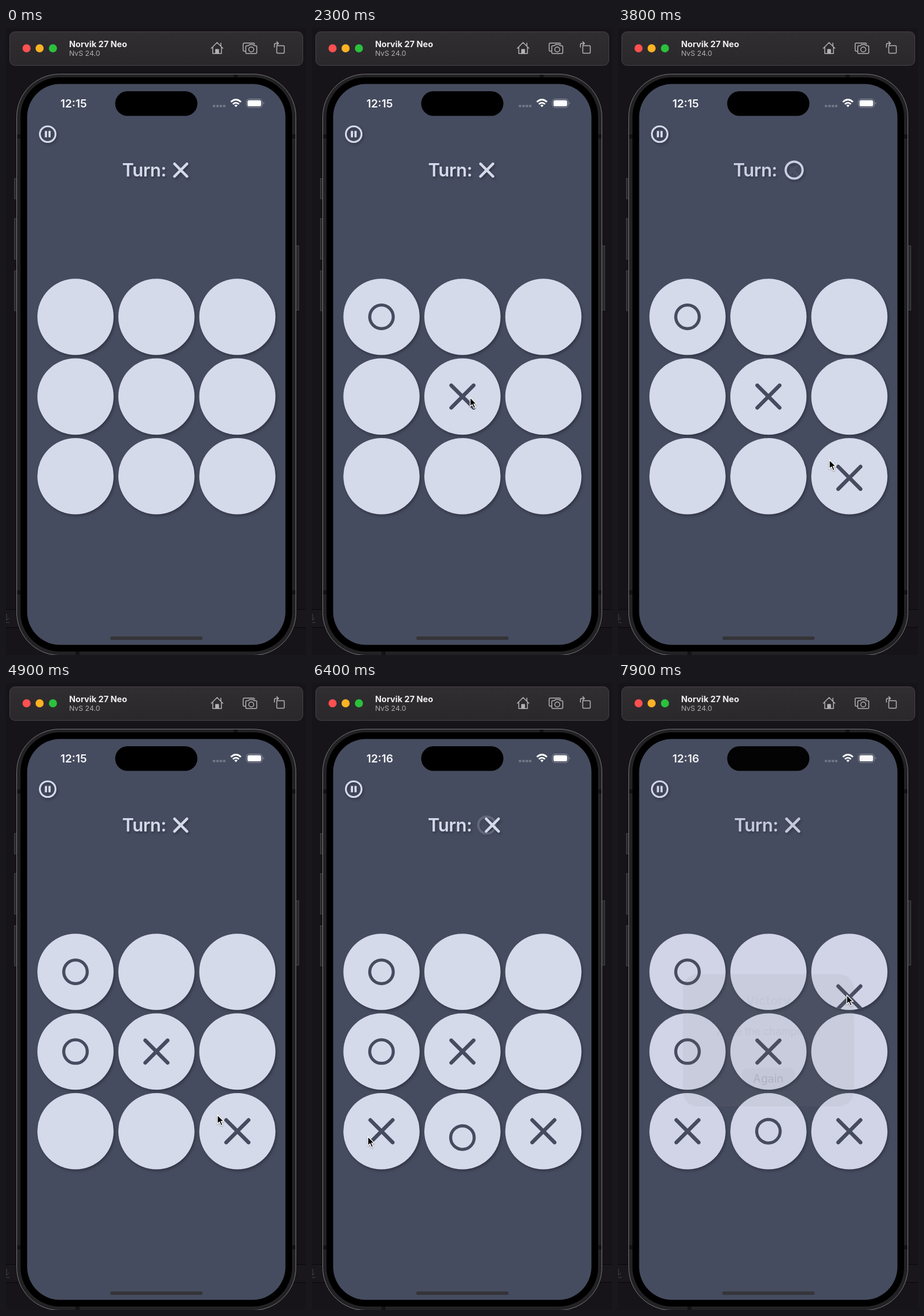
An HTML page for the animation above (8 s loop, 518 px wide and 1081 px high).

```html
<!DOCTYPE html>
<html lang="en">
<head>
<meta charset="utf-8">
<title>Noughts and crosses</title>
<style>
  html, body { margin: 0; width: 100%; height: 100%; overflow: hidden; background: #161418; }
  svg { display: block; width: 100%; height: 100%; }
  text { font-family: Inter, "Liberation Sans", sans-serif; }
  .ink { fill: none; stroke-linecap: round; }
  .soft { filter: drop-shadow(2px 3px 2px rgba(15, 18, 32, .38)); }
  .tool { fill: none; stroke: #b4b2b5; stroke-width: 1.5; stroke-linejoin: round; stroke-linecap: round; }
</style>
</head>
<body>
<svg viewBox="0 0 518 1081" preserveAspectRatio="none">
  <defs>
    <linearGradient id="bar" x2="0" y2="1">
      <stop stop-color="#302e31"/><stop offset="1" stop-color="#2a282b"/>
    </linearGradient>
  </defs>

  <!-- desktop behind the phone -->
  <rect width="518" height="1081" fill="#161418"/>
  <rect y="1003" width="518" height="30" fill="#19171b"/>
  <path d="M0 1002.5H518M0 1033.5H518" stroke="#070608"/>
  <path d="M1 1010V1021M-3 1017L1 1021L5 1017M-4 1025H6" fill="none" stroke="#454347"/>

  <!-- window bar -->
  <rect x="6.5" y="6.5" width="506" height="58" rx="9" fill="url(#bar)" stroke="#454347"/>
  <circle cx="35.5" cy="35" r="7" fill="#fe5050"/>
  <circle cx="58" cy="35" r="7" fill="#fdb224"/>
  <circle cx="81" cy="35" r="7" fill="#2bc13c"/>
  <text x="109" y="32.5" font-size="14.5" font-weight="700" fill="#f0eff1">Norvik 27 Neo</text>
  <text x="109" y="48" font-size="12.3" fill="#b0aeb1">NvS 24.0</text>
  <g class="tool">
    <path d="M354.500 35L364.500 25L374.500 35M357 33V44H372V33M371 31V26"/>
    <path d="M362 44V37H367V44" fill="#b4b2b5"/>
    <path d="M413 40H411.500Q409.500 40 409.500 38V28Q409.500 26 411.500 26H427Q429 26 429 28"/>
    <path d="M416 30.500H418.500L420.500 28.500H426.500L428.500 30.500H431Q433 30.500 433 32.500V42Q433 44 431 44H416Q414 44 414 42V32.500Q414 30.500 416 30.500Z"/>
    <circle cx="423.500" cy="37" r="4.300"/>
    <rect x="467.500" y="30.500" width="13" height="13" rx="1.500"/>
    <path d="M463.500 33V29Q463.500 26.500 466 26.500H470M467.500 23.500L470.500 26.500L467.500 29.500"/>
  </g>

  <!-- phone -->
  <g fill="#29282b" stroke="#434245">
    <rect x="14.500" y="259.500" width="6" height="35"/>
    <rect x="14.500" y="328.500" width="6" height="70"/>
    <rect x="14.500" y="418.500" width="6" height="69"/>
    <rect x="498.500" y="375.500" width="7" height="111"/>
  </g>
  <rect x="18.500" y="79.500" width="482" height="1002" rx="74" fill="#222124" stroke="#777678"/>
  <path d="M19 187H25M494 187H500M19 973H25M494 973H500M396.500 80V86M123.500 1075V1081" stroke="#131214" stroke-width="7"/>
  <rect x="25" y="85" width="469" height="990" rx="68" fill="#000"/>
  <rect x="36.500" y="96.500" width="446" height="967" rx="57" fill="#464c5f"/>
  <rect x="188.500" y="109" width="142" height="42.500" rx="21.200" fill="#000"/>
  <text id="clock" x="94" y="136.500" font-size="19" font-weight="600" fill="#f7f8fb"></text>
  <g fill="#747988">
    <rect x="357" y="132.500" width="4.500" height="4" rx="1.500"/>
    <rect x="363" y="132.500" width="4.500" height="4" rx="1.500"/>
    <rect x="368.800" y="132.500" width="4.500" height="4" rx="1.500"/>
    <rect x="374.500" y="132.500" width="4.500" height="4" rx="1.500"/>
  </g>
  <g fill="none" stroke="#fff" stroke-width="2.800">
    <path d="M388.300 127.500Q397 119.500 405.700 127.500"/>
    <path d="M391.700 131.200Q397 126.500 402.300 131.200"/>
    <path d="M394.200 133.300Q397 131.200 399.800 133.300L397 136.500Z" fill="#fff" stroke="none"/>
  </g>
  <rect x="415" y="122.500" width="27.500" height="14.500" rx="4.500" fill="none" stroke="#8f94a1"/>
  <rect x="417" y="124.500" width="23.500" height="10.500" rx="2.800" fill="#fff"/>
  <path d="M444.300 127.500Q446.800 129.700 444.300 132Z" fill="#8f94a1"/>
  <g class="soft">
    <circle cx="72" cy="183" r="13.500" fill="none" stroke="#d5daeb" stroke-width="3.200"/>
    <path d="M69 177.500V188.500M75.200 177.500V188.500" stroke="#d5daeb" stroke-width="3.800"/>
  </g>
  <rect x="180" y="1049" width="159.500" height="6" rx="3" fill="#343438"/>

  <g id="label" class="soft">
    <text id="turn" y="256" font-size="31" font-weight="600" letter-spacing="-.5" fill="#d5daeb">Turn:</text>
  </g>
  <g id="board"></g>

  <g id="alert">
    <rect x="36.500" y="96.500" width="446" height="967" rx="57" fill="#464c5f" opacity=".04"/>
    <rect x="112" y="502" width="295.500" height="228" rx="26" fill="#777b86" opacity=".09"/>
    <g text-anchor="middle" fill="#464c5f">
      <text x="259.500" y="555" font-size="22" font-weight="600" opacity=".04">Victory</text>
      <text x="259.500" y="607" font-size="18" opacity=".07">X are the champions!</text>
      <rect x="214" y="664" width="91" height="38" rx="9" opacity=".04"/>
      <text x="259.500" y="688.500" font-size="19.500" opacity=".17">Again</text>
    </g>
  </g>

  <path id="cursor" d="M0 0V15.500L3.600 12.200L6.400 18.600L9.100 17.400L6.400 11.200H11.200Z"
    fill="#000" stroke="#fff" stroke-width="1.300" stroke-linejoin="round"
    style="filter:drop-shadow(0 1px 1px rgba(0,0,0,.35))"/>
</svg>

<script>
const LOOP = 8000, STEP = 100, SLIDE = 400;
const LIGHT = '#d5daeb', DARK = '#464b5f';

// time, cell; crosses go first
const moves = [[1200, 4], [1900, 0], [3500, 8], [4300, 3], [5500, 6], [6200, 7], [7900, 2]];

// start, end, from x y, to x y
const trips = [
  [800, 1100, 350, 715, 273, 637],
  [2400, 3400, 273, 637, 365, 744.5],
  [4900, 5400, 365, 744.5, 96.500, 782],
  [6600, 7500, 96.500, 782, 395, 538]
];

const $ = id => document.getElementById(id);

function add(parent, tag, attrs) {
  const node = document.createElementNS('http://www.w3.org/2000/svg', tag);
  for (const key in attrs) node.setAttribute(key, attrs[key]);
  parent.append(node);
  return node;
}

function mark(parent, isX, x, r, width, color) {
  const style = { class: 'ink', stroke: color, 'stroke-width': width };
  return isX
    ? add(parent, 'path', { ...style, d: `M${-x} ${-x}L${x} ${x}M${x} ${-x}L${-x} ${x}` })
    : add(parent, 'circle', { ...style, r });
}

const place = (node, x, y) => node.setAttribute('transform', `translate(${x} ${y})`);
const center = cell => [120 + cell % 3 * 139.75, 498 + Math.floor(cell / 3) * 137.4];
const remaining = age => (1 - Math.min(1, Math.max(0, age / SLIDE))) ** 2;
const show = (node, on) => node.setAttribute('visibility', on ? 'visible' : 'hidden');

const board = $('board');
for (let cell = 0; cell < 9; cell++) {
  const [cx, cy] = center(cell);
  add(board, 'circle', { cx, cy, r: 65.800, fill: LIGHT, class: 'soft' });
  const clip = add(board, 'clipPath', { id: 'cell' + cell });
  add(clip, 'circle', { cx, cy, r: 65.800 });
}
const pieces = moves.map(([, cell], i) => {
  const holder = add(board, 'g', { 'clip-path': `url(#cell${cell})` });
  return mark(holder, i % 2 === 0, 19.300, 20.300, i % 2 ? 5.300 : 6.500, DARK);
});
const turnX = mark($('label'), true, 10.800, 0, 4.600, LIGHT);
const turnO = mark($('label'), false, 0, 14.600, 4, LIGHT);

function drawLabel(t) {
  const last = moves.slice(0, 6).filter(([at]) => at <= t).length - 1;
  const age = last < 0 ? SLIDE : t - moves[last][0];
  const left = remaining(age), isO = last >= 0 && last % 2 === 0;
  const [fresh, old] = isO ? [turnO, turnX] : [turnX, turnO];
  place(fresh, 301.700 + 39 * left, 245);
  place(old, 301.700, 245);
  fresh.setAttribute('opacity', 1);
  old.setAttribute('opacity', left ** 1.100);
  $('turn').setAttribute('x', isO ? 198.500 + 2 * left : 200.500 - 2 * left);
  const dim = t >= 7900 || isO && age >= 300;
  $('label').setAttribute('opacity', dim ? .92 : 1);
}

function drawCursor(t) {
  const trip = trips.filter(([start]) => start <= t).pop();
  show($('cursor'), t >= 900);
  if (!trip) return;
  const [start, end, x0, y0, x1, y1] = trip;
  const p = Math.min(1, (t - start) / (end - start));
  const e = p * p * (3 - 2 * p);
  place($('cursor'), x0 + (x1 - x0) * e, y0 + (y1 - y0) * e);
}

function draw(now) {
  const t = Math.floor(now % LOOP / STEP) * STEP;
  moves.forEach(([at, cell], i) => {
    const [x, y] = center(cell);
    show(pieces[i], t >= at);
    place(pieces[i], x, y + 44 * remaining(t - at));
  });
  drawLabel(t);
  drawCursor(t);
  $('clock').textContent = t < 5600 ? '12:15' : '12:16';
  show($('alert'), t >= 7900);
}

const begin = performance.now();
function tick() {
  draw(performance.now() - begin);
  requestAnimationFrame(tick);
}
tick();
</script>
</body>
</html>
```
